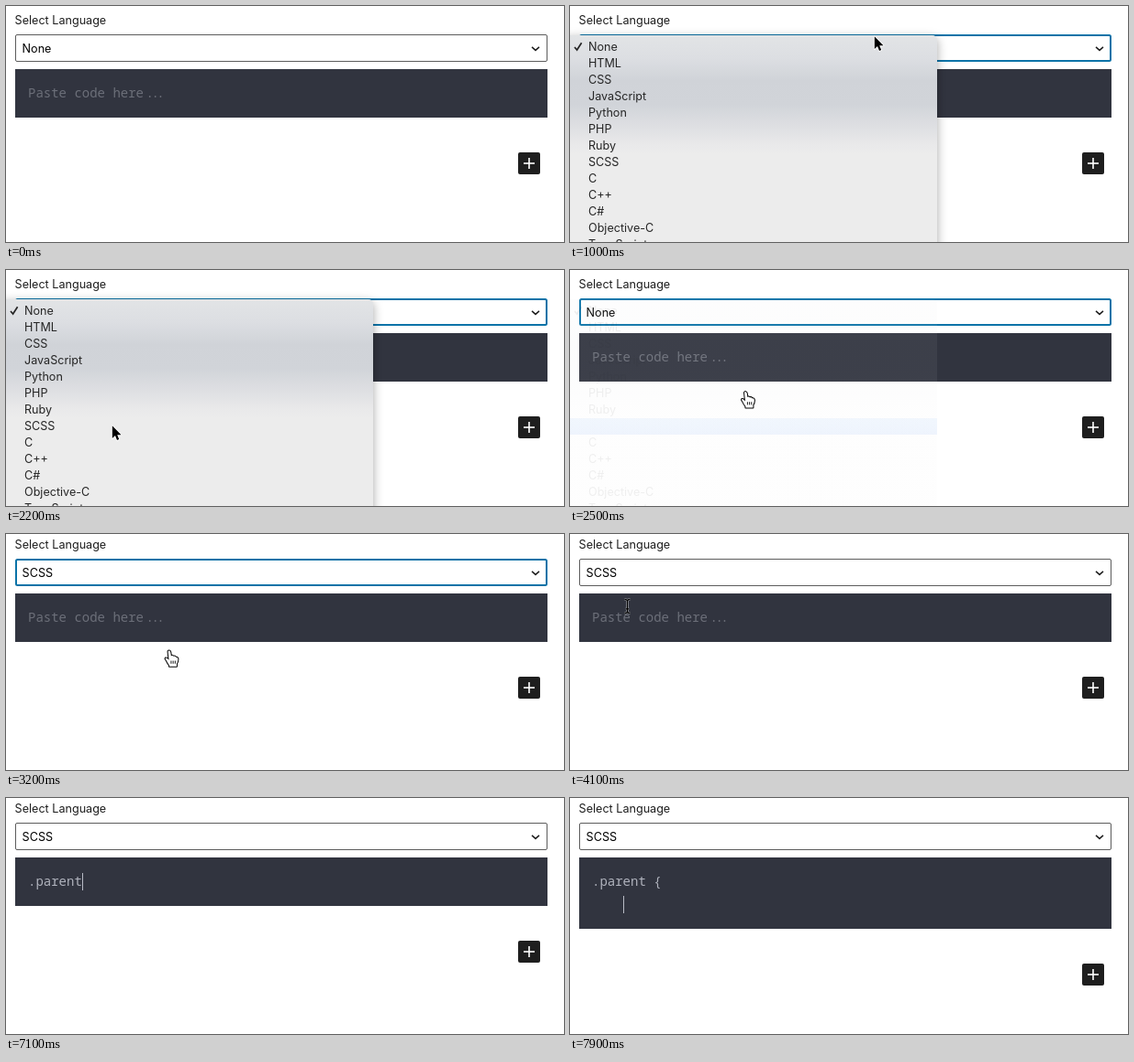
Animation of 608 by 258 pixels, one loop 8000 ms. Source, as an HTML page with a canvas:

```html
<!DOCTYPE html>
<html lang="en">
<head>
<meta charset="utf-8">
<title>Code block editor</title>
<style>
html, body { margin: 0; width: 100%; height: 100%; overflow: hidden; background: #fff; }
canvas { display: block; width: 608px; height: 258px; }
</style>
</head>
<body>
<canvas id="stage" width="608" height="258"></canvas>
<script>
const ctx = document.getElementById('stage').getContext('2d');
const LOOP = 8000, STEP = 100;
const UI_FONT = '12.6px Inter, sans-serif';
const CODE_FONT = '14px "Noto Sans Mono", monospace';
const CHAR = 8.4, CODE_X = 24, LINE = 25, ROW = 18;
const INK = '#1e1e1e';
const LANGUAGES = ['None', 'HTML', 'CSS', 'JavaScript', 'Python', 'PHP', 'Ruby',
  'SCSS', 'C', 'C++', 'C#', 'Objective-C', 'TypeScript'];

// [time, editor content]
const TYPING = [
  [0, ''], [4300, '.'], [4800, ''], [4900, '.'], [5200, '.p'], [5300, '.pa'],
  [5500, '.pare'], [5700, '.paret'], [5800, '.paret '], [6200, '.paret {'],
  [6400, '.paret '], [6500, '.paret'], [6700, '.pare'], [7000, '.paren'],
  [7100, '.parent'], [7200, '.parent '], [7400, '.parent {'],
  [7600, '.parent {\n'], [7900, '.parent {\n    ']
];

// [time, x, y] of the pointer's hot spot
const POINTER = [
  [100, 417, -8], [500, 333, 28], [600, 333, 28], [800, 331, 32.5],
  [1200, 331, 32.5], [2000, 115, 169.5], [2300, 115, 169.5], [2500, 192, 133],
  [3100, 192, 133], [3600, 62.5, 79]
];

const between = (t, from, to) => t >= from && t < to;

function contentAt(t) {
  return TYPING.filter(([time]) => time <= t).pop()[1];
}

function pointerAt(t) {
  const next = POINTER.findIndex(([time]) => time > t);
  if (next < 0) return POINTER[POINTER.length - 1].slice(1);
  const [t0, x0, y0] = POINTER[Math.max(0, next - 1)];
  const [t1, x1, y1] = POINTER[next];
  const p = t1 > t0 ? (t - t0) / (t1 - t0) : 0;
  const e = p * p * (3 - 2 * p);
  return [x0 + (x1 - x0) * e, y0 + (y1 - y0) * e];
}

function text(str, x, y, color, font = UI_FONT) {
  ctx.font = font;
  ctx.fillStyle = color;
  ctx.fillText(str, x, y);
}

function roundBox(x, y, w, h, r) {
  ctx.beginPath();
  ctx.roundRect(x, y, w, h, r);
}

function polyline(points, color, width) {
  ctx.beginPath();
  points.forEach(([x, y]) => ctx.lineTo(x, y));
  ctx.strokeStyle = color;
  ctx.lineWidth = width;
  ctx.stroke();
}

function drawSelect(value, focused) {
  ctx.strokeStyle = focused ? '#0a73a8' : '#5c5c5c';
  ctx.lineWidth = focused ? 2 : 1;
  if (focused) roundBox(11, 31.9, 578, 28.2, 1.5);
  else roundBox(10.5, 31.5, 579, 29, 1.5);
  ctx.stroke();
  text(value, 17.6, 51, '#000');
  polyline([[573, 44.9], [577, 48.4], [581, 44.9]], INK, 1.5);
}

function drawEditor(content, caretOn) {
  const lines = content.split('\n');
  ctx.fillStyle = '#31343f';
  ctx.fillRect(10, 69, 580, 28 + LINE * lines.length);
  if (content) {
    lines.forEach((line, i) => text(line, CODE_X, 100 + LINE * i, '#b0b3bd', CODE_FONT));
  } else {
    text('Paste code here', CODE_X, 100, '#6c6f79', CODE_FONT);
    for (let i = -1; i <= 1; i++) text('.', 158.4 + i * 5.8, 100, '#6c6f79', CODE_FONT);
  }
  if (caretOn) {
    const row = lines.length - 1;
    ctx.fillStyle = '#b9bcc6';
    ctx.fillRect(Math.round(CODE_X + CHAR * lines[row].length), 86 + LINE * row, 1, 19);
  }
  drawAddButton(160 + LINE * (lines.length - 1));
}

function drawAddButton(y) {
  ctx.fillStyle = INK;
  roundBox(558, y, 24, 24, 2);
  ctx.fill();
  ctx.fillStyle = '#fff';
  ctx.fillRect(564, y + 11.2, 12, 1.6);
  ctx.fillRect(569.2, y + 6, 1.6, 12);
}

function drawMenu(active, alpha) {
  ctx.save();
  ctx.globalAlpha = alpha;
  const glass = ctx.createLinearGradient(0, 32, 0, 162);
  [[0, '#e2e4e6'], [0.2, '#dcdee2'], [0.38, '#d0d3d8'], [0.58, '#d1d4d9'],
    [0.78, '#dfe0e3'], [0.92, '#e9e9ea'], [1, '#ececec']]
    .forEach(([at, color]) => glass.addColorStop(at, color));
  ctx.save();
  ctx.shadowColor = `rgba(0,0,0,${0.35 * alpha})`;
  ctx.shadowBlur = 11;
  ctx.shadowOffsetY = 3;
  ctx.fillStyle = glass;
  roundBox(-6, 32, 406, 300, 5);
  ctx.fill();
  ctx.restore();

  if (active >= 0) {
    const top = 36 + ROW * active;
    const blue = ctx.createLinearGradient(0, top, 0, top + ROW);
    blue.addColorStop(0, '#4a97f8');
    blue.addColorStop(1, '#2272f2');
    ctx.fillStyle = blue;
    ctx.fillRect(0, top, 400, ROW);
  }
  LANGUAGES.forEach((name, i) =>
    text(name, 20, 49 + ROW * i, i === active ? '#fff' : '#262626'));
  polyline([[5, 45], [7.6, 48], [12.6, 40.2]], active === 0 ? '#fff' : '#262626', 1.7);
  ctx.restore();
}

function outlined(path, fill, stroke, width) {
  ctx.strokeStyle = stroke;
  ctx.lineWidth = width;
  ctx.lineJoin = 'round';
  ctx.stroke(path);
  ctx.fillStyle = fill;
  ctx.fill(path);
}

const ARROW = new Path2D('M.8 .8V14.6L4 11.6L6 16.4L8.2 15.5L6.2 10.8H10.5Z');
const HAND = new Path2D('M-2 1.2Q-1.8 -.2 -.5 .2Q.6 .5 .8 2L1.4 6Q2.8 4.8 4 6.4' +
  'Q5.6 5.6 6.6 7.4Q8.8 7 8.9 9.6Q8.8 12.4 7.4 14.4V17.4H-.6V16' +
  'Q-2.6 13.6 -3.6 11.2L-5 9Q-4.8 7.4 -3 8.4L-1 10.4Z');
const HAND_FOLDS = new Path2D('M1.4 11.2V14.4M3.6 11.2V14.4M5.8 11.2V14.4');
const BEAM = new Path2D('M-3 -7.5Q0 -7.5 0 -5.5Q0 -7.5 3 -7.5M0 -5.5V5.5' +
  'M-3 7.5Q0 7.5 0 5.5Q0 7.5 3 7.5M-1.8 2.8H1.8');

function drawPointer(t) {
  if (!between(t, 100, 4300)) return;
  const [x, y] = pointerAt(t);
  ctx.save();
  ctx.translate(x, y);
  if (t < 2400) {
    outlined(ARROW, '#000', '#fff', 1.8);
  } else if (y > 118) {
    outlined(HAND, '#fff', '#000', 2);
    ctx.lineWidth = 0.9;
    ctx.stroke(HAND_FOLDS);
  } else {
    ctx.strokeStyle = '#a9abb2';
    ctx.lineWidth = 2.6;
    ctx.stroke(BEAM);
    ctx.strokeStyle = '#000';
    ctx.lineWidth = 1.3;
    ctx.stroke(BEAM);
  }
  ctx.restore();
}

function activeRow(t) {
  // The chosen row blinks off once before the menu closes.
  if (t < 1300 || t === 2200) return -1;
  if (t >= 2000) return 7;
  return Math.floor((pointerAt(t)[1] - 36) / ROW);
}

function menuAlpha(t) {
  if (t < 2400) return 1;
  return t < 2500 ? 0.45 : 0.07;
}

function draw(t) {
  ctx.fillStyle = '#fff';
  ctx.fillRect(0, 0, 608, 258);
  ctx.save();
  if (t >= 2600) ctx.translate(0, -4);
  text('Select Language', 9.6, 20, INK);
  drawSelect(t < 2600 ? 'None' : 'SCSS', between(t, 1000, 3600));
  drawEditor(contentAt(t), between(t, 200, 700) || between(t, 3600, 4100) || t >= 4300);
  ctx.restore();
  if (between(t, 1000, 2600)) drawMenu(activeRow(t), menuAlpha(t));
  drawPointer(t);
}

function tick() {
  draw(Math.floor((performance.now() % LOOP) / STEP) * STEP);
  requestAnimationFrame(tick);
}
tick();
</script>
</body>
</html>
```
